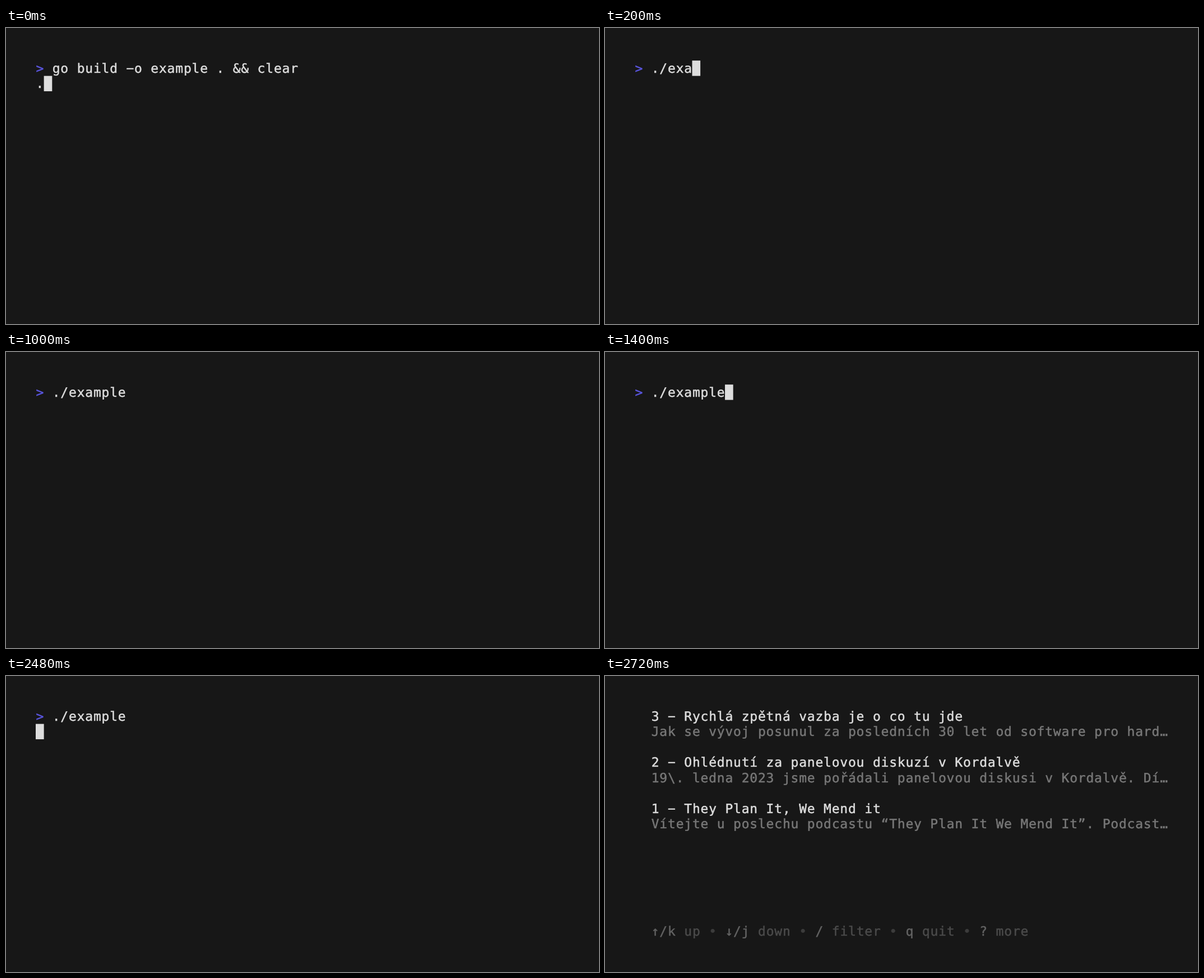
These frames come from a looping animation (1058 px wide and 529 px high, 5.36 s). An HTML page:

```html
<!DOCTYPE html>
<html lang="cs">
<head>
<meta charset="utf-8">
<title>Terminal</title>
<style>
  html, body { margin: 0; width: 100%; height: 100%; overflow: hidden; background: #171717; }
  svg { display: block; width: 100vw; height: 100vh; }
  text {
    font: 22.92px "DejaVu Sans Mono", "Liberation Mono", monospace;
    letter-spacing: 0.845px;
    white-space: pre;
    text-rendering: geometricPrecision;
    color: #ddd;
    fill: currentColor;
    stroke: currentColor;
    stroke-width: 0.5px;
  }
  .prompt { color: #5a56e0; }
  .desc { color: #777; }
  .key { color: #626262; }
  .hint { color: #4a4a4a; }
  .dot { color: #3c3c3c; }
</style>
</head>
<body>
<svg viewBox="0 0 1058 529">
  <g id="shell"></g>
  <g id="list"></g>
  <rect id="cursor" fill="#ddd"/>
</svg>
<script>
const LOOP = 5360, TICK = 40;
const LEFT = 53, TOP = 58.2, CELL = 14.64, LINE = 27.43;
const BEARING = 0.45, BASELINE = 21.8;
const COMMAND = "./example";
const SVG_NS = "http://www.w3.org/2000/svg";

const shell = document.getElementById("shell");
const list = document.getElementById("list");
const cursor = document.getElementById("cursor");

function addText(parent, col, row, content, className = "") {
  const node = document.createElementNS(SVG_NS, "text");
  node.setAttribute("x", LEFT + col * CELL + BEARING);
  node.setAttribute("y", TOP + row * LINE + BASELINE);
  node.setAttribute("class", className);
  node.textContent = content;
  parent.append(node);
  return node;
}

function setCursor(col, row, visible = true) {
  cursor.setAttribute("x", LEFT + col * CELL);
  cursor.setAttribute("y", TOP + row * LINE);
  cursor.setAttribute("visibility", visible ? "visible" : "hidden");
}

const show = (node, visible) => { node.style.display = visible ? "" : "none"; };

addText(shell, 0, 0, ">", "prompt");
const input = addText(shell, 2, 0, "");
const echo = addText(shell, 0, 1, ".");

const episodes = [
  ["3 − Rychlá zpětná vazba je o co tu jde",
   "Jak se vývoj posunul za posledních 30 let od software pro hard…"],
  ["2 − Ohlédnutí za panelovou diskuzí v Kordalvě",
   "19\\. ledna 2023 jsme pořádali panelovou diskusi v Kordalvě. Dí…"],
  ["1 − They Plan It, We Mend it",
   "Vítejte u poslechu podcastu “They Plan It We Mend It”. Podcast…"]
];
episodes.forEach(([title, desc], i) => {
  addText(list, 2, i * 3, title);
  addText(list, 2, i * 3 + 1, desc, "desc");
});

const help = [["↑/k", "up"], ["↓/j", "down"], ["/", "filter"], ["q", "quit"], ["?", "more"]];
let helpCol = 2;
help.forEach(([key, hint], i) => {
  if (i) {
    addText(list, helpCol + 1, 14, "•", "dot");
    helpCol += 3;
  }
  addText(list, helpCol, 14, key, "key");
  helpCol += key.length + 1;
  addText(list, helpCol, 14, hint, "hint");
  helpCol += hint.length;
});

function render(time) {
  const t = Math.floor((time % LOOP) / TICK) * TICK;
  const building = t < 40;
  const typed = COMMAND.slice(0, 1 + Math.floor((t + 20) / 50));

  show(shell, t < 2680);
  show(list, t >= 2720);
  show(echo, building);
  input.textContent = building ? "go build −o example . && clear" : typed;

  if (building) setCursor(1, 1);
  else if (t < 2480) setCursor(2 + typed.length, 0, t < 1000 || (t >= 1400 && t < 2040));
  else setCursor(0, 1, t < 2680);
}

cursor.setAttribute("width", CELL);
cursor.setAttribute("height", LINE);

const start = performance.now();
function frame() {
  render(performance.now() - start);
  requestAnimationFrame(frame);
}
frame();
</script>
</body>
</html>
```
